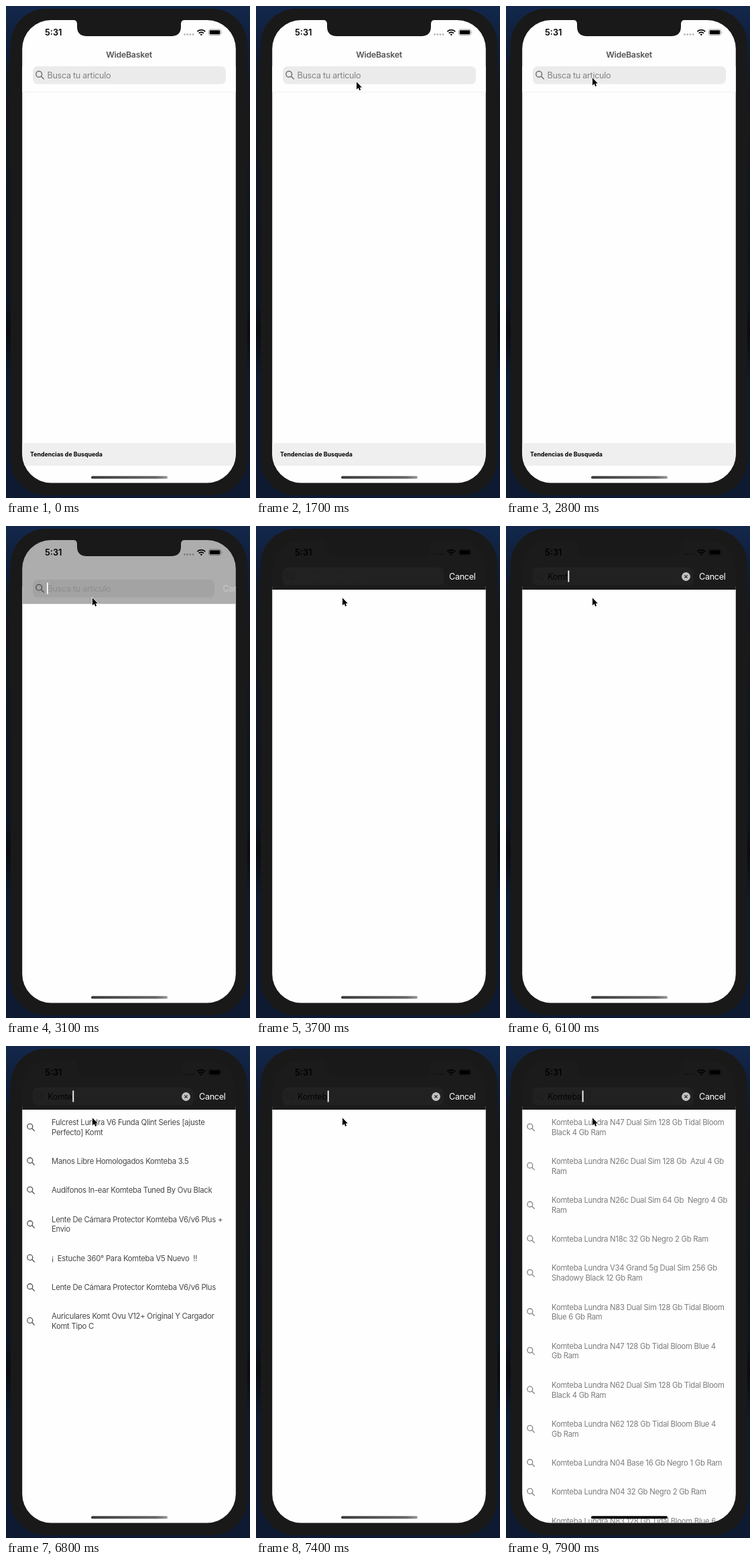
Animation, 364 px wide and 734 px high, one loop 8 s. Source, as an HTML page:

```html
<!DOCTYPE html>
<html lang="es">
<head>
<meta charset="utf-8">
<style>
html, body { margin: 0; width: 100%; height: 100%; overflow: hidden; background: #0b1425; }
svg { display: block; width: 364px; height: 734px; }
text { font-family: Inter, Roboto, sans-serif; white-space: pre; }
.bar { font-size: 12.6px; letter-spacing: -.3px; }
.row { font-size: 11.3px; letter-spacing: -.26px; fill: #484848; }
</style>
</head>
<body>
<svg viewBox="0 0 364 734">
  <defs>
    <linearGradient id="night" x2="0" y2="1">
      <stop offset="0" stop-color="#12284c"/>
      <stop offset=".09" stop-color="#101d35"/>
      <stop offset=".17" stop-color="#15181f"/>
      <stop offset=".45" stop-color="#10151f"/>
      <stop offset=".6" stop-color="#0d1624"/>
      <stop offset=".66" stop-color="#0a0c11"/>
      <stop offset=".75" stop-color="#0d1a2f"/>
      <stop offset="1" stop-color="#0d1a31"/>
    </linearGradient>
    <linearGradient id="pill">
      <stop offset="0" stop-color="#3c3c3c"/>
      <stop offset=".85" stop-color="#686868"/>
      <stop offset="1" stop-color="#999"/>
    </linearGradient>
    <clipPath id="screen"><rect x="24.2" y="21" width="318.6" height="690.4" rx="43"/></clipPath>
    <g id="lens" fill="none" stroke-width="1.3" stroke-linecap="round">
      <circle cx="-1.2" cy="-1.2" r="4"/>
      <path d="M1.8 1.8 5.3 5.3"/>
    </g>
  </defs>

  <rect width="364" height="734" fill="url(#night)"/>
  <path d="M4.5 80h4v36h-4zM4.5 130h4v52h-4zM4.5 190h4v46h-4zM358 150h4v86h-4z" fill="#191919"/>
  <rect x="7" y="4" width="353" height="726" rx="53" fill="#191919"/>

  <g clip-path="url(#screen)">
    <rect x="24" y="90" width="319" height="622" fill="#fefefe"/>
    <g id="footer">
      <rect x="24" y="652" width="319" height="34" fill="#efefef"/>
      <text x="36" y="672" font-size="8.8" font-weight="700">Tendencias de Busqueda</text>
    </g>
    <g id="lists"></g>
    <rect id="header" x="24" y="21" width="319"/>
    <path id="rule" d="M24 128.5H343" stroke="#f0f0f0"/>
    <text id="title" x="183.5" y="77" font-size="12.4" font-weight="600" letter-spacing="-.3"
      text-anchor="middle" fill="#555">WideBasket</text>
    <g id="search">
      <rect id="field" x="40" y="90" height="26.5" rx="7"/>
      <use id="glass" href="#lens" transform="translate(50.5 103) scale(1.1)"/>
      <text id="hint" class="bar" x="61.5" y="108" fill="#828286">Busca tu articulo</text>
      <text id="typed" class="bar" x="62" y="108" fill="#040404"></text>
      <rect id="caret" y="94.5" width="1.8" height="17" fill="#fff"/>
      <g id="clear" transform="translate(268.5 103.5)">
        <circle r="6.4" fill="#c2c2c2"/>
        <path d="M-2.2-2.2 2.2 2.2M-2.2 2.2 2.2-2.2" stroke="#222" stroke-width="1.2"/>
      </g>
      <text id="cancel" class="bar" y="108" fill="#fff">Cancel</text>
    </g>
    <text x="58" y="44" font-size="12.8" font-weight="600">5:31</text>
    <g fill-opacity=".28">
      <circle cx="266.5" cy="42.5" r="1.4"/><circle cx="270.7" cy="42.5" r="1.4"/>
      <circle cx="274.9" cy="42.5" r="1.4"/><circle cx="279.1" cy="42.5" r="1.4"/>
    </g>
    <g fill="none" stroke="#000" stroke-width="1.8">
      <path d="M285.4 38.2a8.2 8.2 0 0 1 11.8 0M287.7 40.7a5 5 0 0 1 7.2 0"/>
      <path d="M291.3 44.2 289.6 42.4a2.4 2.4 0 0 1 3.4 0Z" fill="#000" stroke="none"/>
    </g>
    <rect x="302.5" y="35" width="18" height="8.6" rx="2.5" fill="none" stroke="#000" stroke-opacity=".4" stroke-width=".9"/>
    <rect x="303.8" y="36.3" width="15.4" height="6" rx="1.4"/>
    <path d="M321.8 37.8q1.6 1.5 0 3z" fill-opacity=".45"/>
    <rect id="home" x="127" y="701.3" width="114" height="4" rx="2"/>
  </g>
  <path d="M99 20.5q7 0 7 6v4q0 14.5 14.5 14.5h126q14.5 0 14.5-14.5v-4q0-6 7-6z" fill="#191919"/>
  <path id="pointer" d="M0 0V11.2L2.6 8.8 4.3 12.6 6.1 11.8 4.5 8.2H7.9Z" stroke="#fff" stroke-width="1.2" paint-order="stroke"/>
</svg>

<script>
const LOOP = 8000, LINE = 14.8;
const WORD = 'Komteba';
const KEYS = [4300, 4800, 5000, 5900, 6500, 7100, 7500];
// "|" marks a line break
const RESULTS = [
  { from: 6450, to: 7300, rows: [
    'Fulcrest Lundra V6 Funda Qlint Series [ajuste|Perfecto] Komt',
    'Manos Libre Homologados Komteba 3.5',
    'Audífonos In-ear Komteba Tuned By Ovu Black',
    'Lente De Cámara Protector Komteba V6/v6 Plus +|Envio',
    '¡  Estuche 360° Para Komteba V5 Nuevo  !!',
    'Lente De Cámara Protector Komteba V6/v6 Plus',
    'Auriculares Komt Ovu V12+ Original Y Cargador|Komt Tipo C'] },
  { from: 7700, to: LOOP, rows: [
    'N47 Dual Sim 128 Gb Tidal Bloom|Black 4 Gb Ram',
    'N26c Dual Sim 128 Gb  Azul 4 Gb|Ram',
    'N26c Dual Sim 64 Gb  Negro 4 Gb|Ram',
    'N18c 32 Gb Negro 2 Gb Ram',
    'V34 Grand 5g Dual Sim 256 Gb|Shadowy Black 12 Gb Ram',
    'N83 Dual Sim 128 Gb Tidal Bloom|Blue 6 Gb Ram',
    'N47 128 Gb Tidal Bloom Blue 4|Gb Ram',
    'N62 Dual Sim 128 Gb Tidal Bloom|Black 4 Gb Ram',
    'N62 128 Gb Tidal Bloom Blue 4|Gb Ram',
    'N04 Base 16 Gb Negro 1 Gb Ram',
    'N04 32 Gb Negro 2 Gb Ram',
    'N83 128 Gb Tidal Bloom Blue 6|Gb Ram'].map(s => WORD + ' Lundra ' + s) }
];

const $ = id => document.getElementById(id);
const set = (id, attrs) => { for (const k in attrs) $(id).setAttribute(k, attrs[k]); };
const clamp = x => Math.max(0, Math.min(1, x));
const mix = (a, b, p) => a + (b - a) * p;
const gray = (a, b, p) => { const v = Math.round(mix(a, b, p)); return `rgb(${v},${v},${v})`; };

function rowsMarkup(rows) {
  let top = 92.2;
  return rows.map(row => {
    const lines = row.split('|');
    const height = lines.length * LINE + 28.5;
    const mid = top + height / 2;
    top += height;
    return `<use href="#lens" x="37" y="${mid}" stroke="#555"/>` + lines.map((line, i) =>
      `<text class="row" x="68" y="${mid + (i - (lines.length - 1) / 2) * LINE + 4}">${line}</text>`).join('');
  }).join('');
}
$('lists').innerHTML = RESULTS.map((r, i) => `<g id="list${i}">${rowsMarkup(r.rows)}</g>`).join('');

function draw(t) {
  // search bar activation
  const s = clamp((t - 2960) / 350);
  const p = s * s * (3 - 2 * s);
  const fade = clamp(1 - 3 * p);
  set('header', { height: 107 - 33 * p, fill: gray(254, 27, p) });
  set('rule', { opacity: fade });
  set('title', { opacity: fade });
  set('footer', { opacity: fade });
  set('search', { transform: `translate(0 ${-28 * p})` });
  set('field', { width: mix(288, 240, p), fill: gray(235, 33, p) });
  set('glass', { stroke: gray(108, 28, p) });
  set('cancel', { x: 288 + 55 * (1 - p), opacity: p });

  // typing and caret
  const count = KEYS.filter(k => t >= k).length;
  $('typed').textContent = WORD.slice(0, count);
  set('hint', { opacity: count ? 0 : 1 - .97 * p });
  set('clear', { opacity: count ? 1 : 0 });
  const idle = t - (count ? KEYS[count - 1] : 3000);
  set('caret', {
    x: count ? 63 + $('typed').getComputedTextLength() : 61,
    opacity: idle >= 0 && idle % 1000 < 600 ? 1 : 0
  });

  RESULTS.forEach((r, i) =>
    set('list' + i, { opacity: t < r.to ? clamp((t - r.from) / 280) : 0 }));
  set('home', { fill: t >= RESULTS[1].from ? '#000' : 'url(#pill)' });

  // pointer glides in from the right
  const left = (1 - clamp((t - 1000) / 1000)) ** 2;
  set('pointer', {
    transform: `translate(${129 + 236 * left} ${107.3 + 67 * left})`,
    opacity: t >= 1000 ? 1 : 0
  });
}

const start = performance.now();
function tick() {
  draw((performance.now() - start) % LOOP);
  requestAnimationFrame(tick);
}
tick();
</script>
</body>
</html>
```
